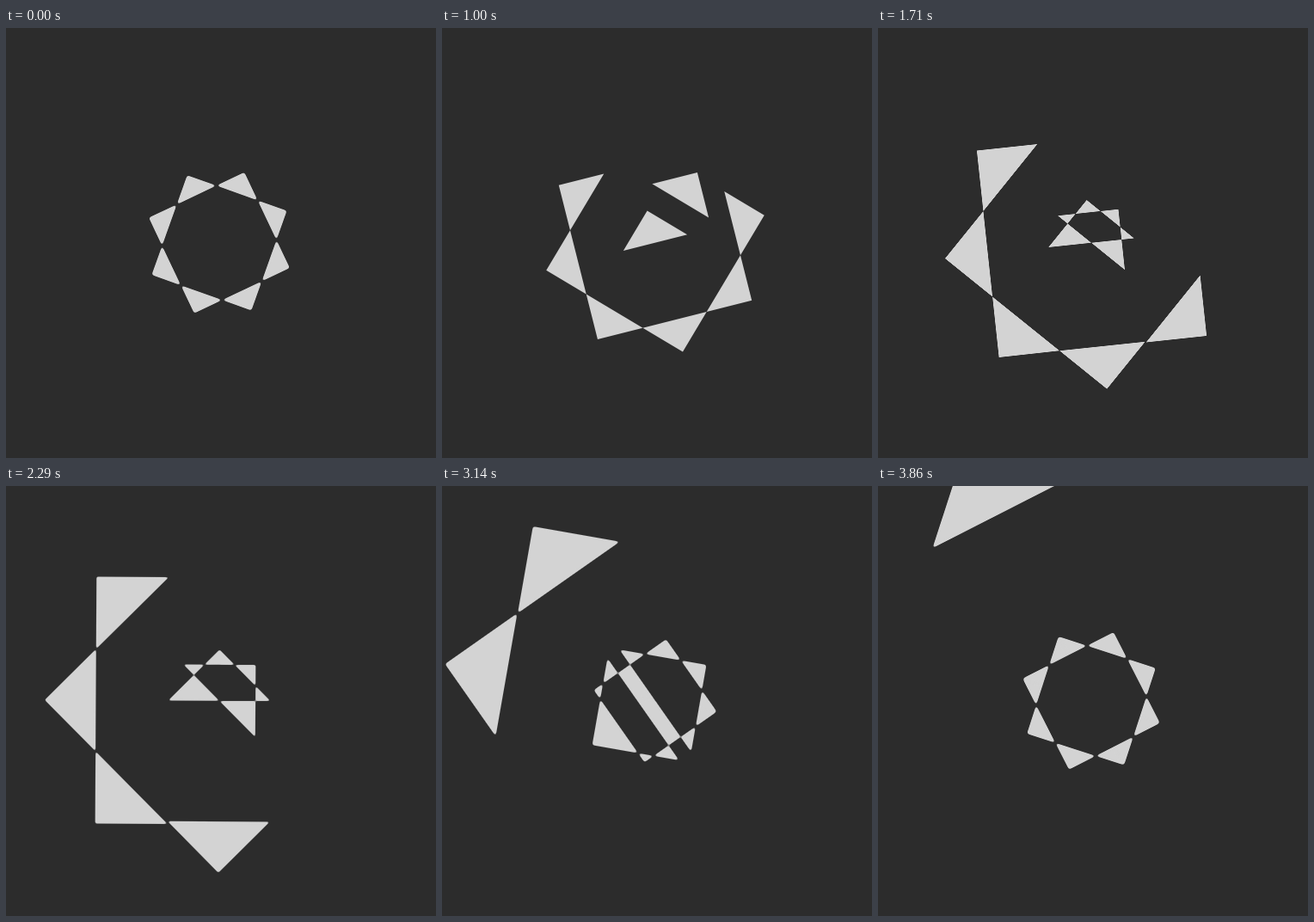
An HTML page for the animation above (4.01 s loop, 500x500 px).

```html
<!DOCTYPE html>
<html lang="en">
<head>
<meta charset="utf-8">
<title>Eight triangles</title>
<style>
  html, body { margin: 0; width: 100%; height: 100%; overflow: hidden; background: #2c2c2c; }
  svg { display: block; width: 100vw; height: 100vh; }
</style>
</head>
<body>
<svg viewBox="0 0 500 500">
  <filter id="soften" filterUnits="userSpaceOnUse" x="-20" y="-20" width="540" height="540"
          color-interpolation-filters="sRGB">
    <feGaussianBlur id="blur" stdDeviation="1"/>
    <feComponentTransfer><feFuncA id="cut" type="linear"/></feComponentTransfer>
  </filter>
  <g filter="url(#soften)">
    <path id="shape" fill="#d3d3d3" fill-rule="evenodd"/>
  </g>
</svg>
<script>
  const $ = id => document.getElementById(id);
  const shape = $('shape'), blur = $('blur'), cut = $('cut');

  const LOOP = 4010, FPS = 7, FRAMES = 28;
  const CX = 248, CY = 249.8;
  const ZOOM = 2 + Math.SQRT2;      // growth per loop
  const STEP = 0.5, MOVE = 1.04;    // delay per triangle, length of a move, in seconds

  // Knots spread evenly over the loop
  const radii = [87, 107, 139, 171, 203, 231.5, 264.5, 87 * ZOOM];
  const blurs = [1.8, 0.05, 0.2, 0.6, 1.1, 1.25, 1.75, 1.8];

  const easeInOut = p => p < 0.5 ? 2 ** (20 * p - 11) : 1 - 2 ** (9 - 20 * p);

  function radiusAt(u) {
    const i = Math.floor(u), f = u - i;
    const a = i ? radii[i - 1] : radii[6] / ZOOM;
    const b = radii[i], c = radii[i + 1];
    const d = i < 6 ? radii[i + 2] : radii[1] * ZOOM;
    return b + f / 2 * (c - a + f * (2 * a - 5 * b + 4 * c - d + f * (3 * (b - c) + d - a)));
  }

  function blurAt(u) {
    const i = Math.floor(u);
    return blurs[i] + (blurs[i + 1] - blurs[i]) * (u - i);
  }

  // Right triangle whose apex points away from the centre
  function triangle(angle, apex, h) {
    const c = Math.cos(angle), s = Math.sin(angle);
    const at = (r, w) => (CX + r * c - w * s).toFixed(2) + ' ' + (CY + r * s + w * c).toFixed(2);
    return `M${at(apex, 0)}L${at(apex - h, h)}L${at(apex - h, -h)}Z`;
  }

  // Two fold into the middle, two fly off, and again
  function shift(k, t) {
    const e = t - STEP * k;
    if (e <= 0) return 0;
    return k % 4 < 2
      ? -Math.SQRT1_2 * easeInOut(Math.min(1, e / MOVE))
      : 2.4 * Math.exp(20 * (Math.min(e, 0.7) - 0.5));
  }

  function draw(t) {
    const u = t * 7 / 4;
    const R = radiusAt(u), sigma = blurAt(u);
    const h = R * (1 - Math.SQRT1_2);
    let d = '';
    for (let k = 0; k < 8; k++) {
      const angle = (-115.4 + 45 * (k + t / 4)) * Math.PI / 180;
      d += triangle(angle, R * (1 + shift(k, t)), h);
    }
    const slope = Math.max(1, 2.5 * sigma);
    shape.setAttribute('d', d);
    blur.setAttribute('stdDeviation', sigma);
    cut.setAttribute('slope', slope);
    cut.setAttribute('intercept', (1 - slope) / 2);
  }

  const start = performance.now();
  let shown = -1;
  function tick() {
    const ms = (performance.now() - start) % LOOP;
    const n = Math.min(FRAMES - 1, Math.floor((ms + 5) * FPS / 1000));
    if (n !== shown) draw((shown = n) / FPS);
    requestAnimationFrame(tick);
  }
  tick();
</script>
</body>
</html>
```
